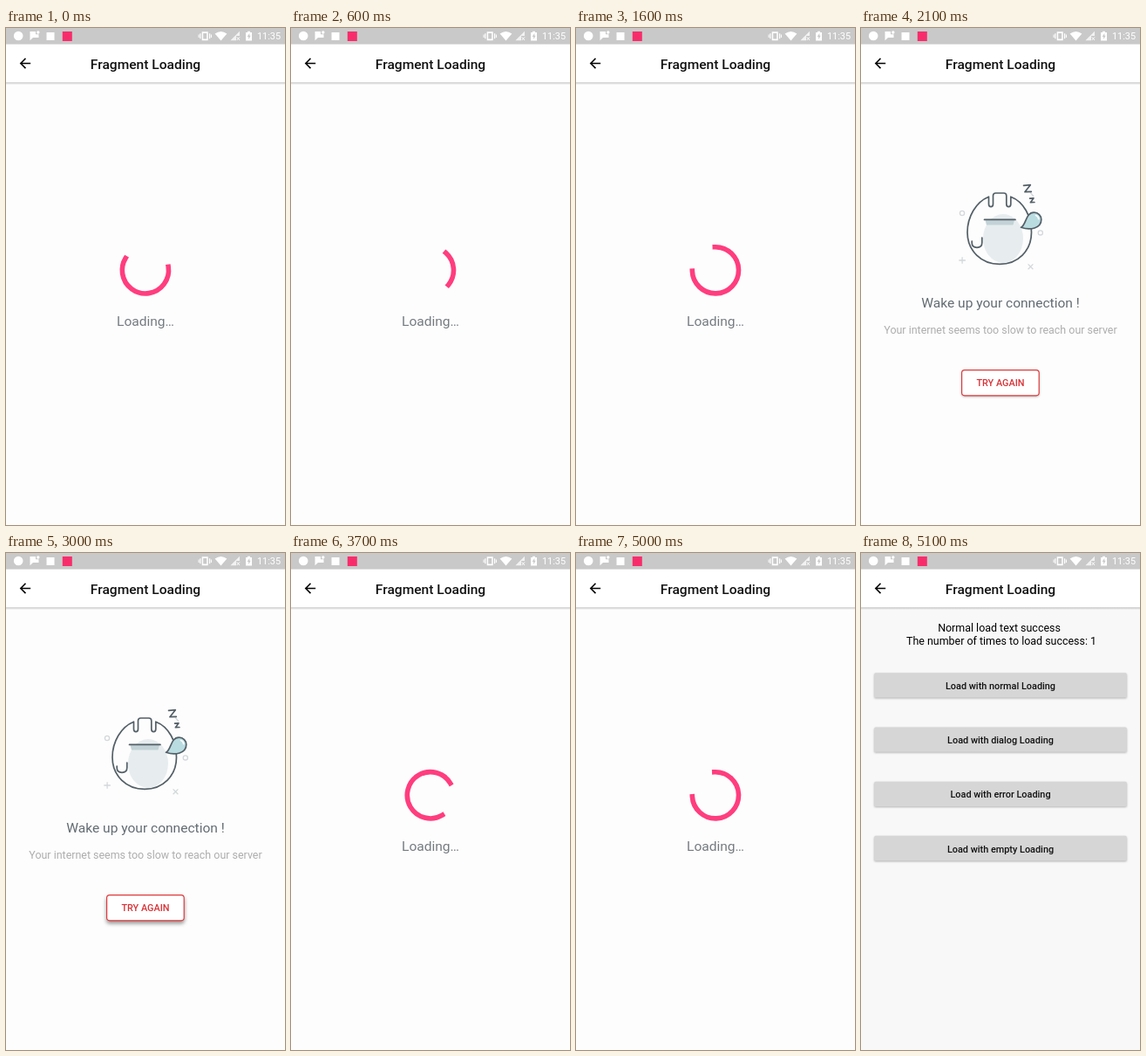
An HTML page for the animation above (5800 ms loop, 320 px wide and 569 px high).

```html
<!DOCTYPE html>
<html lang="en">
<head>
<meta charset="utf-8">
<title>Fragment Loading</title>
<style>
  html, body { margin: 0; width: 100%; height: 100%; overflow: hidden; background: #fdfdfd; }
  svg { display: block; width: 100vw; height: 100vh; }
  text { font-family: Roboto, "Noto Sans", sans-serif; text-anchor: middle; }
  .big { font-size: 15.56px; }
  .mid { font-size: 12.45px; }
  .small { font-size: 10.89px; }
  .medium { font-weight: 500; }
  .ink { fill: none; stroke: #535f67; stroke-width: 1.7; stroke-linecap: round; stroke-linejoin: round; }
  .faint { fill: none; stroke: #d3d8db; stroke-width: 1.3; }
  .flat { fill: #d6d6d6; filter: drop-shadow(0 1px .8px rgba(0, 0, 0, .28)); }
</style>
</head>
<body>
<svg viewBox="0 0 320 569">
  <defs>
    <linearGradient id="edge" x2="0" y2="1">
      <stop stop-color="#000" stop-opacity=".27"/>
      <stop offset=".5" stop-color="#000" stop-opacity=".12"/>
      <stop offset="1" stop-color="#000" stop-opacity="0"/>
    </linearGradient>
  </defs>
  <rect id="page" width="320" height="569" fill="#fdfdfd"/>

  <!-- status bar and toolbar -->
  <rect y="62" width="320" height="3" fill="url(#edge)"/>
  <rect y="18" width="320" height="44.3" fill="#fff"/>
  <rect width="320" height="18.6" fill="#c9c9c9"/>
  <g fill="#fff">
    <circle cx="14.2" cy="9" r="5.3"/>
    <path d="M27.5 4H34v3.2h3.5V11H31l-3.5 3.2z"/>
    <circle cx="36.8" cy="5" r="1.7"/>
    <rect x="46.5" y="5" width="9" height="9"/>
    <path d="M224.7 4.2h7v10h-7zM226.2 5.9v6.6h4V5.9z" fill-rule="evenodd"/>
    <path d="M222.3 6.2h1.2v6h-1.2zM233 6.2h1.2v6H233zM220.6 7.5h1v3.4h-1zM234.9 7.5h1v3.4h-1z"/>
    <path d="M239.6 6.6Q246.5 1.4 253.4 6.6L246.5 14.6z"/>
    <path d="M268 3.8V9h-4v5.2h-6.6z" opacity=".75"/>
    <path d="M264.8 10.4l3.2 3.6M268 10.4l-3.2 3.6" stroke="#fff" stroke-width="1"/>
    <path d="M275 5h2V3.8h3V5h2v9.4h-7zM279.3 6l-2.6 4h1.5v3l2.5-4.2h-1.4z" fill-rule="evenodd"/>
    <text class="small" x="301.5" y="13.1">11:35</text>
  </g>
  <rect x="64.8" y="4" width="11" height="11" fill="#f72d6b"/>
  <path transform="translate(12.6 31.1) scale(.778)"
    d="M20 11H7.83l5.59-5.59L12 4l-8 8 8 8 1.41-1.41L7.83 13H20z"/>
  <text class="big medium" x="160" y="46.6" fill="#111">Fragment Loading</text>

  <g id="loading">
    <circle id="ring" r="26.6" pathLength="360" fill="none" stroke="#ff3d7f"
      stroke-width="5.6" stroke-linecap="square"/>
    <text class="big" x="160" y="341.2" fill="#757b80">Loading…</text>
  </g>

  <g id="failure">
    <ellipse cx="163" cy="241" rx="23" ry="28" fill="#e7edef"/>
    <path d="M142.5 220h33.5l-1.5 5.5H144z" fill="#c2d2d6"/>
    <g class="faint">
      <circle cx="116" cy="212" r="2.6"/>
      <circle cx="205.8" cy="234.4" r="2.6"/>
      <path d="M112.3 266h7.6M116.1 262.2v7.6M191.6 270.4l5.8 5.8M197.4 270.4l-5.8 5.8M194 188l4 5"/>
    </g>
    <g class="ink">
      <path d="M146.5 193.2C132 199 122 216 122 234C122 255 138 270.3 159 270.3
        C180 270.3 195.5 255 195.5 234C195.5 216 187 199 171.8 193.2V201.5
        Q171.8 204.6 169.3 204.6T166.8 201.5V192Q166.8 189 163.8 189H154.5
        Q151.5 189 151.5 192V201.5Q151.5 204.6 149 204.6T146.5 201.5Z"/>
      <path d="M141.5 219.4H177"/>
      <path d="M127.2 244v1.8Q127.2 251.3 133 251.3T138.8 245.8V240"/>
      <path d="M183.5 228.3C189.5 226 188.5 211.2 198.5 211.2
        C203.3 211.2 206.8 214.7 206.8 219.3C206.8 229.5 194 231.8 183.5 228.3Z" fill="#b9dce1"/>
      <path d="M186.5 180.3l7.8-.6-6.4 8 7.4-.3M193.6 195.2l4.4-.4-3.6 4.9 4.5-.2"/>
    </g>
    <path d="M200.5 214.6q3 1 3.2 4" fill="none" stroke="#fff" stroke-width="1.6" stroke-linecap="round"/>
    <text class="big" x="160" y="320.2" fill="#626b72">Wake up your connection !</text>
    <text class="mid" x="160" y="350.4" fill="#adadad">Your internet seems too slow to reach our server</text>
    <rect id="retry" x="115.6" y="391.6" width="88.6" height="29.2" rx="3.2"
      fill="#fff" stroke="#df3a3d" stroke-width="1.2"/>
    <text class="small medium" x="160" y="410.3" fill="#d93236">TRY AGAIN</text>
  </g>

  <g id="success">
    <text class="mid" x="158.5" y="90.3">Normal load text success</text>
    <text class="mid" x="161" y="104.8">The number of times to load success: 1</text>
  </g>
</svg>
<script>
const LOOP = 5800, TICK = 100, CYCLE = 1333, TURN = 4444 / 2;
const $ = id => document.getElementById(id);

["normal", "dialog", "error", "empty"].forEach((kind, i) => {
  const y = 137.2 + i * 62.22;
  $("success").insertAdjacentHTML("beforeend",
    `<rect class="flat" x="15.2" y="${y}" width="289.6" height="28.4" rx="1.6"/>
     <text class="small medium" x="160" y="${y + 18.7}" fill="#111">Load with ${kind} Loading</text>`);
});

function bezier(x, x1, y1, x2, y2) {
  const at = (u, a, b) => 3 * (1 - u) ** 2 * u * a + 3 * (1 - u) * u * u * b + u ** 3;
  let lo = 0, hi = 1;
  for (let i = 0; i < 24; i++) {
    const u = (lo + hi) / 2;
    if (at(u, x1, x2) < x) lo = u; else hi = u;
  }
  return at(lo, y1, y2);
}

// The head runs in the first half of a cycle, the tail catches up in the second.
const head = p => p >= .5 ? 1 : bezier(p * 2, .4, 0, .2, 1);
const tail = p => p <= .5 ? 0 : bezier(p * 2 - 1, .4, 0, .2, 1);

function spin(age) {
  const p = age % CYCLE / CYCLE;
  const start = 270 * tail(p);
  const sweep = Math.max(.1, 270 * head(p) - start);
  const angle = age / TURN * 360 + 90 * p + start - 90;
  $("ring").setAttribute("transform", `translate(159.9 277.3) rotate(${angle})`);
  $("ring").setAttribute("stroke-dasharray", `${sweep} ${720 - sweep}`);
}

function lift(k) {
  $("retry").style.filter =
    `drop-shadow(0 ${1 + 2 * k}px ${.8 + 1.2 * k}px rgba(0,0,0,${.25 + .15 * k}))`;
}

// [from, view, start of the spinner]
const scenes = [
  [0, "loading", -355],
  [1700, "failure"],
  [3100, "loading", 3050],
  [5100, "success"]
];

function draw(now) {
  const t = Math.floor(now % LOOP / TICK) * TICK;
  const [, view, began] = scenes.findLast(s => t >= s[0]);
  for (const id of ["loading", "failure", "success"])
    $(id).style.display = id === view ? "" : "none";
  $("page").setAttribute("fill", view === "success" ? "#f8f8f8" : "#fdfdfd");
  if (view === "loading") spin(t - began);
  lift(t < 2900 ? 0 : t < 3000 ? .5 : 1);
}

const origin = performance.now();
function frame() {
  draw(performance.now() - origin);
  requestAnimationFrame(frame);
}
frame();
</script>
</body>
</html>
```
